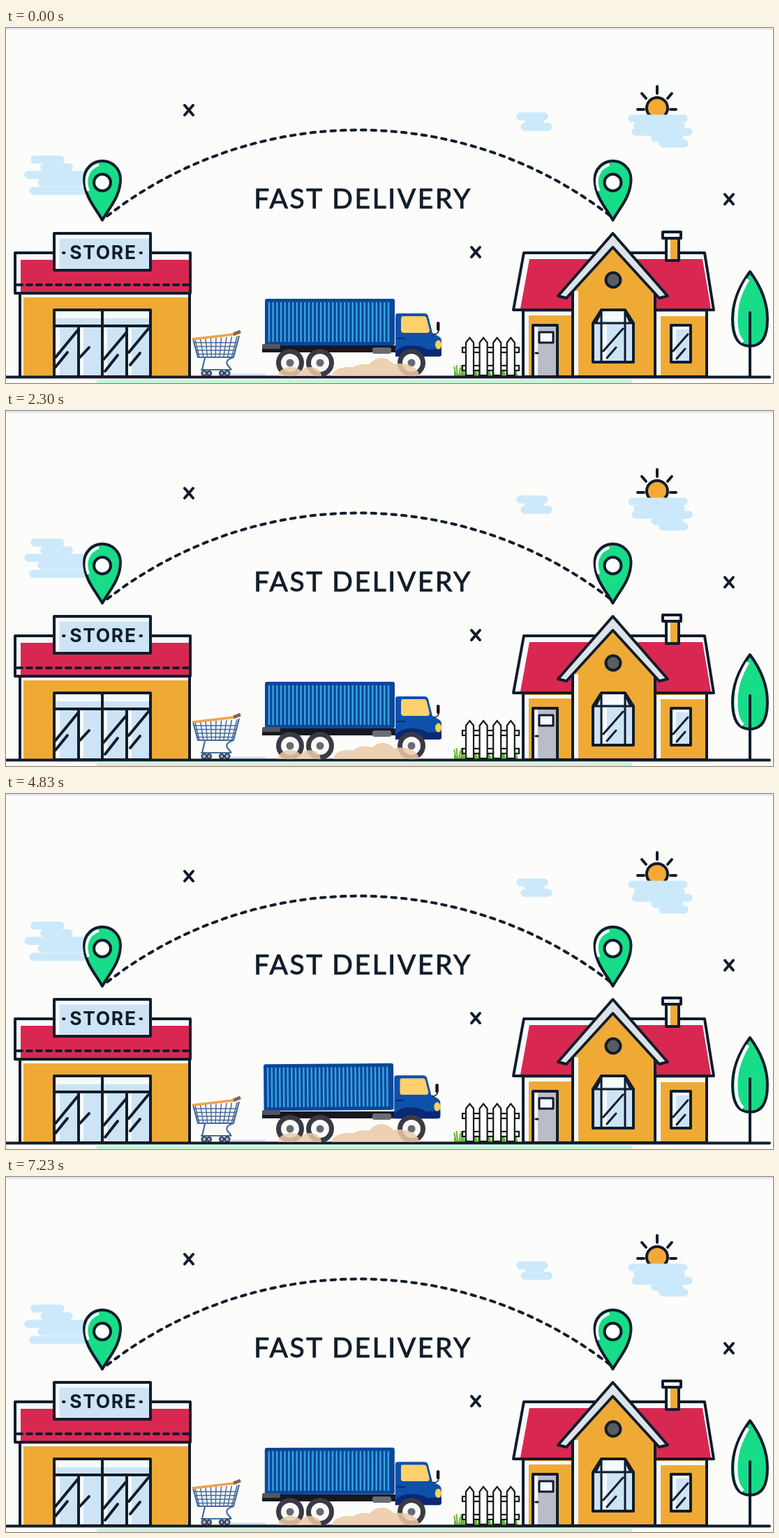
These frames come from a looping animation (1099 by 510 pixels, 7.26 s). An HTML page:

```html
<!DOCTYPE html>
<html lang="en">
<head>
<meta charset="utf-8">
<title>Fast delivery</title>
<style>
  html, body { margin: 0; width: 100%; height: 100%; overflow: hidden; background: #fcfdfa; }
  svg { display: block; width: 100%; height: 100%; }
  .ink { stroke: #111c2b; stroke-width: 4; stroke-linejoin: round; stroke-linecap: round; }
  .line { fill: none; }
  .thin { stroke-width: 3; }
  .wall { fill: #efaa36; }
  .red { fill: #d82852; }
  .glass { fill: #cde4f6; }
  .pale { fill: #f6fafc; }
  .green { fill: #17dc88; }
  .cloud { stroke: #cbe9fb; stroke-linecap: round; fill: none; }
  text { fill: #111c2b; text-anchor: middle; }
</style>
</head>
<body>
<svg viewBox="0 0 1099 510" preserveAspectRatio="none">
  <defs>
    <clipPath id="sky"><rect x="900" y="80" width="70" height="46"/></clipPath>
    <clipPath id="above"><rect x="360" y="440" width="280" height="60"/></clipPath>
    <clipPath id="pane"><path d="M569 414H599Q602 414 603 418L607 434Q607 438 603 438H570Q566 438 566 434V418Q566 414 569 414Z"/></clipPath>
    <g id="pin">
      <path class="ink green" d="M0 54C-10 36-26 20-26-5A26 26 0 0 1 26-5C26 20 10 36 0 54Z"/>
      <path d="M-20 12C-26-4-22-20-5-26" fill="none" stroke="#f6fafc" stroke-width="4"/>
      <circle class="ink" r="12" fill="#fdfefd"/>
    </g>
    <path id="cross" class="ink line" d="M-6-7L6 7M6-7L-6 7"/>
    <g id="wheel">
      <circle r="20" fill="#393a43"/>
      <circle r="13" fill="#fafafa"/>
      <circle r="5.5" fill="#686b75"/>
    </g>
  </defs>

  <rect width="1099" height="3" fill="#e6e7f6"/>
  <rect x="130" y="505" width="767" height="5" fill="#c8f5dc"/>

  <g id="clouds"></g>

  <g clip-path="url(#sky)">
    <circle class="ink" cx="933" cy="115" r="15" fill="#f5a934"/>
  </g>
  <path class="ink line" d="M933 84V94M911 94L917 101M954 94L948 101M905 117H914M952 117H960"/>
  <path class="cloud" stroke-width="11" d="M897 130H971"/>

  <path class="ink line" d="M145 270A588 588 0 0 1 866 270" stroke-dasharray="6.500 8"/>
  <use href="#pin" x="138" y="222"/>
  <use href="#pin" x="869.5" y="222"/>
  <use href="#cross" x="262" y="118"/>
  <use href="#cross" x="673" y="322"/>
  <use href="#cross" x="1036" y="246"/>
  <text x="511.500" y="259" font-family="Lato, sans-serif" font-size="39" letter-spacing="2.6" stroke="#111c2b" stroke-width=".9">FAST DELIVERY</text>

  <!-- store -->
  <g>
    <path class="pale" d="M14 323H264V501H20V381H14Z"/>
    <rect class="red" x="21" y="333" width="242" height="47"/>
    <rect class="wall" x="25" y="387" width="238" height="113"/>
    <path class="ink line" d="M20 501V381M13 380V323H264V380M13 381H264M263 381V501"/>
    <path class="ink line" d="M16 369H264" stroke-dasharray="7 7"/>
    <rect class="ink glass" x="69" y="295" width="138" height="53"/>
    <path class="line" d="M74 346V300H205" stroke="#f6fafc" stroke-width="5"/>
    <text x="139.500" y="332" font-family="Inter, sans-serif" font-weight="700" font-size="26.500" letter-spacing="1.7">STORE</text>
    <path class="ink line" d="M82 323H83.500M192.500 323H194"/>
    <rect class="ink glass" x="69" y="405" width="138" height="96"/>
    <rect class="pale" x="71" y="407" width="134" height="10"/>
    <path class="pale" d="M71 430H77V499H71ZM106 430H111V499H106ZM140 430H145V499H140ZM175 430H180V499H175Z"/>
    <path class="ink line" d="M69 428H207M138 405V501M104 428V501M173 428V501M71 473L103 434M71 487L88 466M106 473L119 459M140 476L172 438M142 493L160 470M176 466L204 432M178 484L192 467"/>
  </g>

  <!-- trolley -->
  <g fill="none" stroke="#456a9c" stroke-width="2.200">
    <path id="basket" stroke-width="1.500"/>
    <path d="M268 447L275 473H326L334 442M326 473Q311 478 319 486L323 491M279 491H323M281 491L285 474"/>
    <path d="M267 447L327 440" stroke="#f0a24a" stroke-width="3.5"/>
    <path d="M326 440L336 436" stroke="#8d6253" stroke-width="5"/>
    <g fill="#9fb0c4" stroke="#36445c">
      <circle cx="284" cy="496" r="3.5"/><circle cx="291" cy="496" r="3"/>
      <circle cx="309" cy="496" r="3"/><circle cx="317" cy="496" r="3.5"/>
    </g>
  </g>
  <path d="M322 498H372" stroke="#cfe1f4" stroke-width="3"/>

  <!-- house -->
  <g>
    <path class="ink wall" d="M741 405H1004V501H741Z"/>
    <path class="pale" d="M743 408H749V499H743ZM932 408H1002V414H938V499H932ZM743 408H810V413H743Z"/>
    <path class="ink pale" d="M742 323H1001L1014 405H727Z"/>
    <path class="red" d="M750 332H998L1010 403H737Z"/>
    <path class="ink wall" d="M946 302H964V334H946Z"/>
    <path class="pale" d="M948 304H952V332H948Z"/>
    <path class="ink pale" d="M941 293H967V302H941Z"/>
    <path class="ink wall" d="M812 501V374L870 310L930 374V501Z"/>
    <path class="pale" d="M814 378H820V499H814Z"/>
    <path class="ink" fill="#dce4e9" d="M869.500 295L948 385L936 388L869.500 315L803 388L791 385Z"/>
    <circle class="ink" cx="870" cy="362" r="10.5" fill="#5b5c62"/>

    <path class="ink" fill="#b7bec8" d="M755 427H790V501H755Z"/>
    <path class="pale" d="M757 429H762V499H757Z"/>
    <path class="ink thin pale" d="M764 437H784V452H764Z"/>
    <path class="ink thin line" d="M759 467H762"/>

    <path class="ink glass" d="M853 405H887L899 424V480H841V424Z"/>
    <path class="pale" d="M855 407H885V421H855ZM855 426H861V477H855Z"/>
    <path class="ink thin line" d="M841 424H899M853 406V480M887 406V480M845 424L853 407M895 424L887 407M856 464L884 432M861 474L874 459"/>

    <path class="ink glass" d="M953 427H981V480H953Z"/>
    <path class="pale" d="M955 429H960V478H955ZM955 429H979V433H955Z"/>
    <path class="ink thin line" d="M956 464L977 440M961 475L973 461"/>
  </g>

  <!-- tree -->
  <path class="ink green" d="M1066 350C1080 369 1091 393 1091 418C1091 445 1082 457 1066 457S1041 445 1041 418C1041 393 1052 369 1066 350Z"/>
  <path class="line" d="M1063 361C1050 383 1046 399 1046 419C1046 434 1049 445 1056 451" stroke="#f6fafc" stroke-width="5"/>
  <path class="ink line" d="M1066 409V501"/>

  <path id="grass" fill="none" stroke="#62b52f" stroke-width="2"/>
  <g id="fence" stroke="#15181d" stroke-width="2.200" fill="#fff"></g>

  <path class="ink" d="M0 501.500H1094"/>

  <!-- truck -->
  <g>
    <path d="M367 456H565V466H367Z" fill="#17181f"/>
    <g id="box">
      <rect x="371" y="389" width="186" height="67" rx="3" fill="#0b469b"/>
      <path id="ribs" stroke="#33a5d9" stroke-width="2.500"/>
    </g>
    <rect x="367" y="454" width="26" height="7" rx="2" fill="#54565f"/>
    <rect x="525" y="459" width="27" height="9" rx="3" fill="#6a6c76"/>
    <g id="cab">
      <path d="M558 413Q558 410 562 410H599Q604 410 605 414L611 438L620 443Q624 445 624 450V468Q624 472 620 472H558Z" fill="#0d51ab"/>
      <path d="M558 472V465Q566 456 581 456T604 462L624 461V469Q624 472 620 472Z" fill="#0a2873"/>
      <path d="M560 446H572" stroke="#0a2873" stroke-width="2"/>
      <g clip-path="url(#pane)">
        <rect x="565" y="413" width="43" height="27" fill="#ffd06d"/>
        <path id="glare" d="M-8-14H3L10 14H-1ZM7-14H10L17 14H14Z" fill="#f5a54c"/>
      </g>
      <path d="M612 440Q621 440 620 432" fill="none" stroke="#22242c" stroke-width="1.5"/>
      <rect x="617" y="422" width="4.5" height="13" rx="2" fill="#17181f"/>
      <ellipse cx="619.5" cy="455" rx="4.5" ry="6.5" fill="#ffd34f"/>
    </g>
    <use href="#wheel" x="407" y="481"/>
    <use href="#wheel" x="450" y="481"/>
    <use href="#wheel" x="581" y="481"/>
    <g id="dust" clip-path="url(#above)" fill="#ebcaa6" opacity=".85"></g>
  </g>
</svg>

<script>
const LOOP = 7260, PUFF = LOOP / 6, BUMP = LOOP / 10;
const $ = id => document.getElementById(id);
const lerp = (a, b, k) => a + (b - a) * k;
const range = (n, f) => Array.from({ length: n }, (_, i) => f(i));

function add(parent, tag, attrs) {
  const el = document.createElementNS('http://www.w3.org/2000/svg', tag);
  for (const k in attrs) el.setAttribute(k, attrs[k]);
  return parent.appendChild(el);
}

// Each cloud row: left, right, middle height
[[36, 83, 189], [50, 95, 200], [27, 116, 211], [46, 116, 222], [34, 116, 234],
 [732, 776, 127], [744, 770, 134], [738, 782, 142],
 [900, 972, 140], [897, 983, 149], [925, 970, 158], [936, 977, 166]
].forEach(([l, r, y]) =>
  add($('clouds'), 'path', { class: 'cloud', 'stroke-width': 11.5, d: `M${l + 5} ${y}H${r - 5}` }));

$('ribs').setAttribute('d', range(31, i => `M${377 + i * 5.7} 394V451`).join(''));

$('basket').setAttribute('d',
  range(9, i => `M${271 + i * 7.5} ${447 - i * .5}L${277 + i * 5.8} 473`).join('') +
  range(4, i => `M${269 + i * 1.6} ${452 + i * 5.5}H${332 - i * 1.5}`).join(''));

[459, 485].forEach(y => add($('fence'), 'rect', { x: 654, y, width: 81, height: 7 }));
range(4, i => add($('fence'), 'path', { d: `M${659 + i * 19.6} 499V452l5.500-7 5.500 7V499Z` }));

$('grass').setAttribute('d', range(46, i => {
  const x = 643 + i * 2, h = 6 + 10 * Math.abs(Math.sin(i * 2.3)) * (i < 14 ? 1 : .6);
  return `M${x} 500l${(3 * Math.sin(i * 5)).toFixed(1)} ${-h.toFixed(1)}`;
}).join(''));

// Dust mounds: [centre, half width, height] when small, then when full
const mounds = [
  [[488, 15, 13], [491, 24, 13]],
  [[516, 19, 22], [514, 25, 17]],
  [[543, 17, 17], [538, 23, 26]],
  [[568, 23, 13], [564, 28, 18]],
  [[405, 16, 13], [408, 18, 13]],
  [[434, 14, 12], [436, 16, 13]]
].map(([a, b]) => ({ a, b, el: add($('dust'), 'ellipse', { cy: 500 }) }));

// Cab lift over one bump: [time, pixels]
const lifts = [[0, 0], [122, 0], [244, 2], [400, 6], [474, 5.8], [588, 1], [696, .7], [BUMP, 0]];

function track(steps, t) {
  const i = Math.max(1, steps.findIndex(s => s[0] >= t));
  const [t0, v0] = steps[i - 1], [t1, v1] = steps[i];
  return lerp(v0, v1, (t - t0) / (t1 - t0));
}

function draw(now) {
  const t = now % LOOP, p = t % PUFF;
  const lift = track(lifts, t % BUMP);
  $('cab').setAttribute('transform', `translate(${-lift * .3} ${-lift})`);
  $('box').setAttribute('transform',
    `translate(${-lift * .25} ${-lift * .25}) rotate(${-lift * .08} 464 456)`);

  const swell = p < 830 ? (1 + Math.cos(Math.PI * p / 830)) / 2 : (p - 830) / (PUFF - 830);
  for (const { a, b, el } of mounds) {
    ['cx', 'rx', 'ry'].forEach((k, i) => el.setAttribute(k, lerp(a[i], b[i], swell)));
  }

  const sweep = lerp(545, 626, (p - 700) / 380);
  $('glare').setAttribute('transform', `translate(${p > 700 && p < 1080 ? sweep : -100} 426)`);
}

const start = performance.now();
function tick() {
  draw(performance.now() - start);
  requestAnimationFrame(tick);
}
tick();
</script>
</body>
</html>
```
